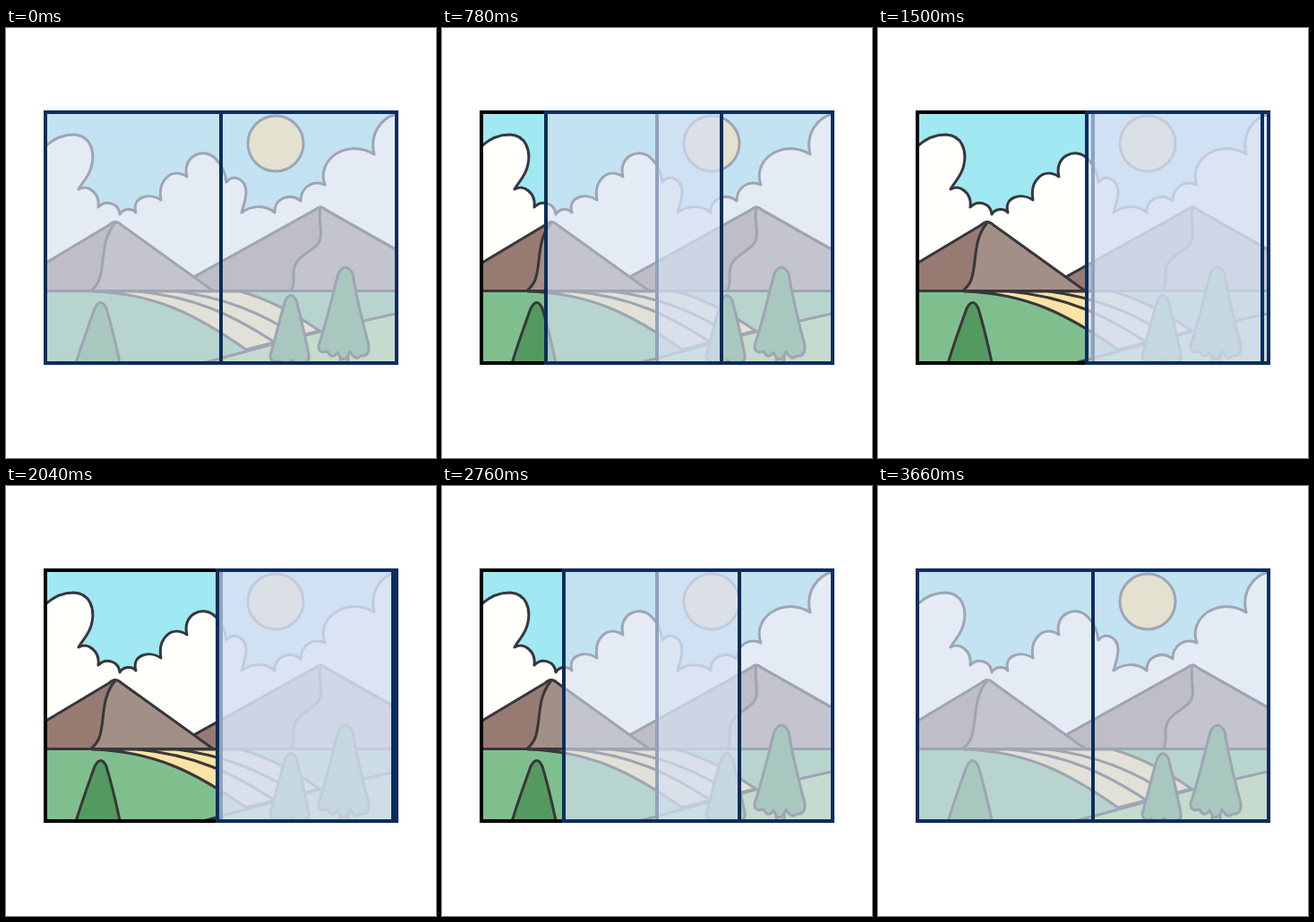
Animation, 480 px wide and 480 px high, one loop 3720 ms. Source, as an HTML page with a canvas:

```html
<!DOCTYPE html>
<html lang="en">
<head>
<meta charset="utf-8">
<title>Sliding window</title>
<style>
  html, body { margin: 0; width: 100%; height: 100%; overflow: hidden; background: #fff; }
  canvas { display: block; width: 480px; height: 480px; }
</style>
</head>
<body>
<canvas id="stage" width="480" height="480"></canvas>
<script>
const ctx = document.getElementById('stage').getContext('2d');

const LOOP = 3720, STEP = 60;
const SLIDE = { out: 130, back: 1973, duration: 1530, distance: 193 };
const BOX = { left: 44, top: 94, width: 392, height: 280 };
const INK = '#38363c', NAVY = '#0c2d5c', GLASS = 'rgba(214,224,243,.65)';

function shape(d, fill, stroke = INK) {
  const path = new Path2D(d);
  if (fill) { ctx.fillStyle = fill; ctx.fill(path); }
  if (stroke) { ctx.strokeStyle = stroke; ctx.stroke(path); }
}

function drawSky() {
  ctx.fillStyle = '#a0e8f2';
  ctx.fillRect(BOX.left, BOX.top, BOX.width, BOX.height);
  shape('M270 129a31 31 0 1 0 62 0a31 31 0 1 0 -62 0Z', '#ffe48f');
  shape(`M40 136C50 125 62 119 76 119C94 120 99 137 96 152C94 165 85 172 81 180
    C91 174 105 184 103 200C112 191 126 196 127 208C131 201 141 201 145 206
    C140 189 159 183 173 192C169 170 185 155 202 166C196 143 221 132 234 146
    C242 154 245 163 246 172C254 163 267 168 268 182C268 192 265 198 263 206
    C274 198 289 197 300 206C299 191 316 183 329 193C329 178 342 169 356 175
    C346 149 378 122 411 141C406 121 416 99 440 95V300H40Z`, '#fffffb');
}

function drawMountains() {
  shape('M180 294.5L345 203Q351 197 357 203L440 250V300H180Z', '#a29087');
  const farRidge = 'M351 200C347 217 358 235 344 245C331 255 320 259 321 277Q322 287 318 294';
  shape(farRidge + 'H180L345 203Z', '#977b72', null);
  shape(farRidge);
  shape('M180 294.5L345 203Q351 197 357 203L440 250');

  const nearSlope = 'M40 265L115 220Q122 213 129 220L232 294';
  shape(nearSlope + 'H40Z', '#a29087', null);
  const nearRidge = 'M122 217C111 231 110 243 108 260C106 279 104 286 94 294';
  shape(nearRidge + 'H40V265L115 220Z', '#977b72', null);
  shape(nearRidge);
  shape(nearSlope);
}

function drawFields() {
  shape('M40 293.5H440V380H40Z', '#7fbf8e', null);
  shape('M96 294C165 296 211 319 268 359L350 338C322 319 296 304 262 294Z', '#fbe3a4');
  shape('M147 294C211 300 254 321 300 351');
  shape('M191 294C246 301 288 319 326 345');
  shape('M40 293.5H440');
  shape('M220 374C285 357 362 334 440 318V380H220Z', '#a5d38a');
}

function drawTrees() {
  const leaf = '#549a60';
  shape('M77 378C84 354 93 330 99 313Q106 300 112 313C118 333 123 354 128 378Z', leaf);
  shape(`M295 365C302 343 306 321 312 304Q318 293 324 304C329 323 334 344 338 365
    Q339 374 331 374Q325 378 319 371Q312 378 306 372Q295 375 295 365Z`, leaf);
  shape('M373 366V380H382V366Z', '#a29087');
  shape(`M349 354C358 328 364 300 371 274Q379 260 387 274C391 301 398 328 405 354
    Q406 367 396 366Q390 372 384 361Q377 378 370 362Q364 371 359 361Q348 364 349 354Z`, leaf);
}

function drawPane(x) {
  ctx.fillStyle = GLASS;
  ctx.fillRect(x, BOX.top, BOX.width / 2, BOX.height);
  ctx.strokeStyle = NAVY;
  ctx.strokeRect(x, BOX.top, BOX.width / 2, BOX.height);
}

// Ease-in-out as the cubic Bezier (.42, 0, .58, 1), solved by bisection.
function ease(x) {
  if (x <= 0) return 0;
  if (x >= 1) return 1;
  let low = 0, high = 1;
  for (let i = 0; i < 24; i++) {
    const u = (low + high) / 2, v = 1 - u;
    if (1.26 * u * v * v + 1.74 * u * u * v + u * u * u < x) low = u;
    else high = u;
  }
  return low * low * (3 - 2 * low);
}

function paneOffset(time) {
  const progress = start => ease((time - start) / SLIDE.duration);
  return Math.round(SLIDE.distance * (progress(SLIDE.out) - progress(SLIDE.back)));
}

function render(time) {
  ctx.fillStyle = '#fff';
  ctx.fillRect(0, 0, 480, 480);
  ctx.save();
  ctx.beginPath();
  ctx.rect(BOX.left, BOX.top, BOX.width, BOX.height);
  ctx.clip();
  ctx.lineWidth = 3;
  ctx.lineJoin = ctx.lineCap = 'round';
  drawSky();
  drawMountains();
  drawFields();
  drawTrees();
  ctx.restore();

  ctx.lineWidth = 4;
  ctx.strokeStyle = '#000';
  ctx.strokeRect(BOX.left, BOX.top, BOX.width, BOX.height);
  drawPane(BOX.left + BOX.width / 2);
  drawPane(BOX.left + paneOffset(time));
}

const start = performance.now();
function tick() {
  const time = (performance.now() - start) % LOOP;
  render(Math.floor(time / STEP) * STEP);
  requestAnimationFrame(tick);
}
tick();
</script>
</body>
</html>
```
